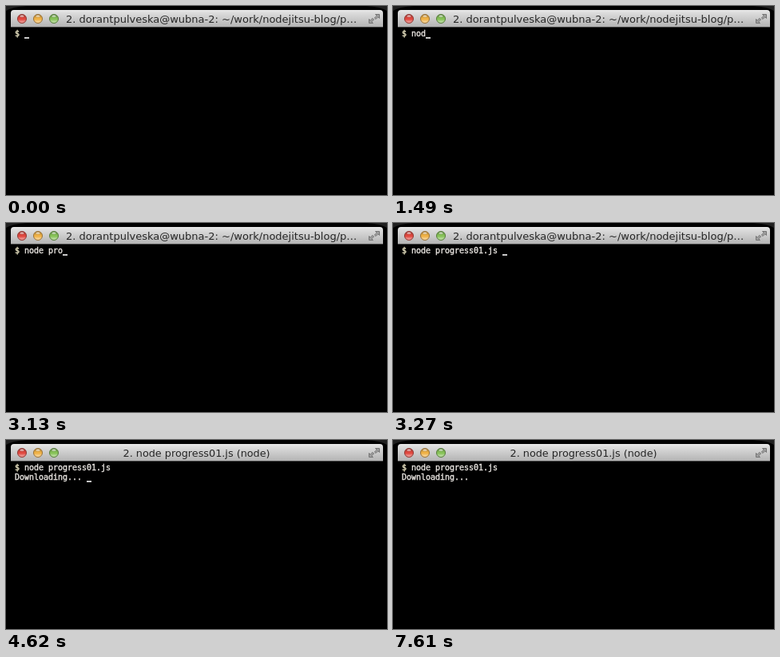
These frames come from a looping animation (477x237 px, 8000 ms). An HTML page:

```html
<!DOCTYPE html>
<html lang="en">
<head>
<meta charset="utf-8">
<title>Terminal</title>
<style>
  html, body { margin: 0; width: 100%; height: 100%; overflow: hidden; background: #000; }
  svg { display: block; width: 100%; height: 100%; }
  text { white-space: pre; }
  #title { font-family: "DejaVu Sans", sans-serif; fill: #262626; }
  .line {
    font: 9.97px "DejaVu Sans Mono", monospace;
    fill: #e6e2de; stroke: #e6e2de; stroke-width: .4px;
  }
</style>
</head>
<body>
<svg viewBox="0 0 477 237">
  <defs>
    <linearGradient id="bar" x2="0" y2="1">
      <stop offset="0" stop-color="#ebebeb"/>
      <stop offset=".12" stop-color="#dedede"/>
      <stop offset="1" stop-color="#b2b2b2"/>
    </linearGradient>
    <linearGradient id="shade" x2="0" y2="1">
      <stop offset="0" stop-color="#000" stop-opacity=".35"/>
      <stop offset=".45" stop-color="#000" stop-opacity="0"/>
      <stop offset=".55" stop-color="#fff" stop-opacity="0"/>
      <stop offset="1" stop-color="#fff" stop-opacity=".55"/>
    </linearGradient>
    <linearGradient id="gloss" x2="0" y2="1">
      <stop offset="0" stop-color="#fff" stop-opacity=".9"/>
      <stop offset="1" stop-color="#fff" stop-opacity=".15"/>
    </linearGradient>
  </defs>
  <rect width="477" height="237"/>
  <path d="M0 0H26Q8 1 0 6ZM477 0H451Q469 1 477 6Z" fill="#202020"/>
  <path d="M6 27V9Q6 5 10 5H468Q472 5 472 9V27Z" fill="url(#bar)"/>
  <path d="M6 26.5H472" stroke="#484848"/>
  <g id="buttons"></g>
  <path d="M462.5 10.500H467.500V15.500L465.800 13.800L463 16.600L461.400 15L464.200 12.200Z
    M459.500 21.500H454.500V16.500L456.200 18.200L459 15.400L460.600 17L457.800 19.800Z"
    fill="#a0a0a0" stroke="#6e6e6e" stroke-width=".9"/>
  <text id="title" y="21"></text>
  <text class="line" x="11" y="38"><tspan fill="#e6e0c0" stroke="#e6e0c0">$</tspan><tspan id="command"></tspan></text>
  <text class="line" id="output" x="11" y="50"></text>
  <rect id="cursor" width="6" height="2" fill="#c8c8c8"/>
</svg>
<script>
const LOOP = 8000, CELL = 6, LEFT = 11;
const $ = id => document.getElementById(id);
const COMMAND = "node progress01.js ";

const titles = [
  { at: 0, x: 75, size: 13, text: "2. dorantpulveska@wubna-2: ~/work/nodejitsu-blog/p…" },
  { at: 4320, x: 151.5, size: 12.8, text: "2. node progress01.js (zsh)" },
  { at: 4620, x: 146.5, size: 12.8, text: "2. node progress01.js (node)" }
];

// [time, number of command characters typed]
const typing = [[0, 0], [1340, 2], [1490, 3], [1640, 4], [1790, 5],
  [2530, 6], [2980, 7], [3130, 8], [3270, COMMAND.length]];

// Spans in which the cursor is blinked off
const hidden = [[150, 1050], [5520, 6570], [7610, LOOP]];

const buttons = [
  [20, "#e0483f", "#8d3a35"],
  [40, "#efb145", "#95703a"],
  [60, "#86c257", "#557a3c"]
];

$("buttons").innerHTML = buttons.map(([x, fill, rim]) =>
  `<circle cx="${x}" cy="16" r="5.5" fill="${fill}" stroke="${rim}"/>
   <circle cx="${x}" cy="16" r="5" fill="url(#shade)"/>
   <ellipse cx="${x}" cy="13" rx="2.600" ry="1.500" fill="url(#gloss)"/>`).join("");

function render(t) {
  const title = titles.findLast(s => t >= s.at);
  $("title").setAttribute("x", title.x);
  $("title").setAttribute("font-size", title.size);
  $("title").textContent = title.text;

  const typed = typing.findLast(([at]) => t >= at)[1];
  $("command").textContent = " " + COMMAND.slice(0, typed);

  const running = t >= 4320;
  const output = t >= 4620 ? "Downloading... " : "";
  $("output").textContent = output;

  const column = running ? output.length : typed + 2;
  $("cursor").setAttribute("x", LEFT + column * CELL);
  $("cursor").setAttribute("y", running ? 51 : 39);
  const off = hidden.some(([from, to]) => t >= from && t < to);
  $("cursor").setAttribute("visibility", off ? "hidden" : "visible");
}

function tick() {
  render(performance.now() % LOOP);
  requestAnimationFrame(tick);
}
tick();
</script>
</body>
</html>
```
